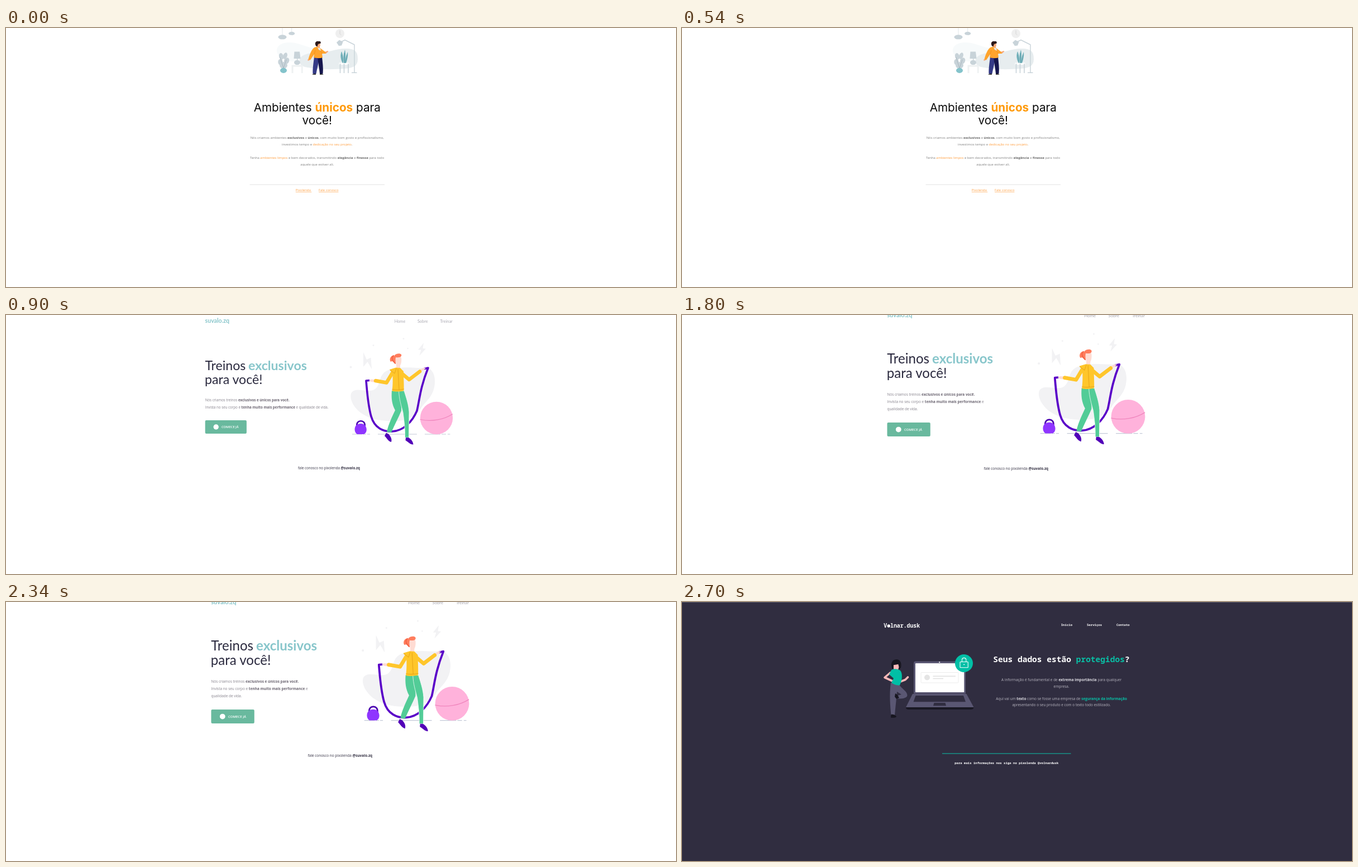
Recreate the animation shown at these times as an HTML page. Size 1200 by 465 pixels, loop 3.6 s.

```html
<!DOCTYPE html>
<html lang="pt-BR">
<head>
<meta charset="utf-8">
<title>Páginas</title>
<style>
html, body { margin: 0; width: 100%; height: 100%; overflow: hidden; background: #fff; }
svg { display: block; width: 1200px; height: 465px; font-family: "Open Sans", sans-serif; }
text { white-space: pre; }
.b { font-weight: 700; }
.mid { text-anchor: middle; }
.line { fill: none; stroke-linecap: round; stroke-linejoin: round; }

.scene { visibility: hidden; animation: 3.6s step-end infinite; }
#decor { animation-name: first; }
#fit { animation-name: middle; }
#safe { animation-name: last; }
@keyframes first { 0% { visibility: visible } 25%, 100% { visibility: hidden } }
@keyframes middle { 0% { visibility: hidden } 25% { visibility: visible } 75%, 100% { visibility: hidden } }
@keyframes last { 0% { visibility: hidden } 75%, 100% { visibility: visible } }

/* the page zooms in halfway and its last sentence wraps */
#zoom, #copy, #button, .wide, .wrapped { animation: 3.6s step-end infinite; }
#zoom { animation-name: zoom; }
#copy { animation-name: rise; }
#button { animation-name: sink; }
.wide { animation-name: wide; }
.wrapped { animation-name: wrapped; }
@keyframes zoom { 0% { transform: none } 50%, 100% { transform: translate(-4.1px, -10.3px) scale(1.0417) } }
@keyframes rise { 0% { transform: none } 50%, 100% { transform: translateY(-6.2px) } }
@keyframes sink { 0% { transform: none } 50%, 100% { transform: translateY(6.2px) } }
@keyframes wide { 0% { fill-opacity: 1 } 50%, 100% { fill-opacity: 0 } }
@keyframes wrapped { 0% { fill-opacity: 0 } 50%, 100% { fill-opacity: 1 } }

#decor .title { font: 400 20.7px Inter, sans-serif; fill: #0b0b0b; }
#decor .title .b { font-weight: 700; fill: #ff9a0a; }
#decor .body { font-size: 5.92px; fill: #808080; }
#decor .body .b { fill: #666; }
#decor .o { fill: #ff9c3c; }
#decor .link { text-decoration: underline; }

#fit .title { font: 400 23.1px Lato, sans-serif; fill: #2b2a3f; }
#fit .title.teal { font-weight: 700; fill: #88c6cb; }
#fit .logo { font: 700 10.6px Lato, sans-serif; fill: #88c6cb; }
#fit .nav { font: 400 7.35px Lato, sans-serif; fill: #aaa9b2; }
#fit .body { font-size: 6.2px; fill: #86828c; }
#fit .body .b { fill: #6c6672; }
#fit .foot { font-size: 6.2px; fill: #353244; }

#safe .mono { font-family: "Noto Sans Mono", "DejaVu Sans Mono", monospace; font-weight: 700; fill: #fff; }
#safe .body { font-size: 6.47px; fill: #b7b5bf; }
#safe .body .b { fill: #dcdbe1; }
#safe .t, #safe .body .t { fill: #08bfa5; }
</style>
</head>
<body>
<svg viewBox="0 0 1200 465">

<g id="decor" class="scene">
  <!-- room -->
  <path fill="#f7fafb" d="M485 41C485 27 503 24 518 27S542 36 558 37 578 50 566 58 540 52 527 58 486 56 485 41Z"/>
  <path fill="#e7edef" d="M526 61C524 50 538 44 556 45S589 37 608 37 630 44 630 56 622 72 606 73 575 75 558 73 527 71 526 61Z"/>
  <path stroke="#d5dde1" stroke-width=".7" d="M495 0V13M511.700 0V8"/>
  <g fill="#c8d3d9">
    <ellipse cx="495" cy="16.300" rx="7.500" ry="4"/>
    <ellipse cx="511.700" cy="9.800" rx="5.600" ry="3"/>
    <path d="M592 26 597 21.500 603.500 25 601 31.500 596 32Z"/>
    <path d="M516.500 42.500H526L527.500 55H515.500ZM521 55h1.300v4H521Z"/>
    <ellipse cx="521.500" cy="62" rx="5.500" ry="4.200"/>
    <ellipse cx="493" cy="51" rx="4" ry="6" transform="rotate(-15 493 51)"/>
    <ellipse cx="500" cy="50" rx="3.600" ry="6" transform="rotate(20 500 50)"/>
    <ellipse cx="491.500" cy="61" rx="4.200" ry="5.500"/>
    <ellipse cx="502.500" cy="59" rx="4.500" ry="6" transform="rotate(25 502.500 59)"/>
    <ellipse cx="497" cy="67" rx="7" ry="6"/>
  </g>
  <path class="line" stroke="#8e9fa8" stroke-width=".5" d="M491 53 497 72 502 57"/>
  <ellipse cx="497" cy="76.300" rx="6" ry="4.600" fill="#84c3cb"/>
  <path fill="#eef1f2" d="M511.500 66.500H531.500V81H529V69.500H514.500V81H511.500Z"/>
  <circle cx="598" cy="10" r="8" fill="#efefef"/>
  <path class="line" stroke="#cfcfcf" stroke-width=".8" d="M598 5V10.500L600 12.500"/>
  <path class="line" stroke="#c8d3d9" stroke-width="1.400" d="M600 25 607 21.500 624 30V80M619.500 80.300H628"/>
  <path fill="#fff" d="M596.500 62.500H614.500V66H596.500Z"/>
  <path stroke="#c8d3d9" stroke-width="1.600" d="M598.500 64V81M605.500 64V81M613 64V81"/>
  <path fill="#76b4bd" d="M603 63C598 54 599 47 601 42 604 48 604 56 604 63ZM605 63C603 52 605 45 607 39 609 47 608 56 607 63ZM607 63C608 53 610 47 612 43 613 50 611 58 609 63Z"/>
  <path stroke="#4f8d98" stroke-width=".5" d="M603.500 62 601.500 48M606 62 606.500 45M608 62 611 48"/>
  <!-- visitor -->
  <path fill="#343a86" d="M552 52 561 53C560 64 557 73 555.500 82H549.500C549 72 551 61 552 52Z"/>
  <path fill="#15164d" d="M558 52 566 52C567 62 568.500 72 567.500 82H562C561 72 559 62 558 52Z"/>
  <path fill="#222" d="M548.500 83.700C549 82 552 82 555 82V83.700ZM562 82C565 82 568 82 568.500 83.700H562Z"/>
  <path fill="#f6a879" d="M556 30H562V37H556ZM540 57 543 55 545 57 541 59ZM571 43 576 41 577.500 42 573 46Z"/>
  <ellipse cx="559.500" cy="30" rx="3.400" ry="4.300" fill="#f6a879"/>
  <path fill="#ffa42d" d="M552 35C556 33 562 34 564 37L572 43 573 46 566 46 567 53C561 55 556 54 551 53L552 47 545 57.500 541.500 56C544 47 547 39 552 35Z"/>
  <path class="line" stroke="#e78812" stroke-width=".6" d="M552 47 554 40M563 40 566 46"/>
  <path fill="#e6e6e6" d="M558 35 563 36 564 41 560 39Z"/>
  <path fill="#2b1719" d="M554 29C553 25 557 23 560 24 563 23 565 26 563 28 560 28 558 29 558 33 555 33 554 31 554 29Z"/>

  <g class="mid">
    <text class="title" x="557.300" y="149.600">Ambientes <tspan class="b">únicos</tspan> para</text>
    <text class="title" x="557.300" y="173">você!</text>
    <g class="body">
      <text x="557.200" y="199.200">Nós criamos ambientes <tspan class="b">exclusivos</tspan> e <tspan class="b">únicos</tspan>, com muito bom gosto e profissionalismo,</text>
      <text x="557.200" y="211">investimos tempo e <tspan class="o">dedicação no seu projeto</tspan>.</text>
      <text x="557.200" y="234.700">Tenha <tspan class="o">ambientes limpos</tspan> e bem decorados, transmitindo <tspan class="b">elegância</tspan> e <tspan class="b">finesse</tspan> para todo</text>
      <text x="557.200" y="246.500">aquele que estiver ali.</text>
    </g>
  </g>
  <path stroke="#dcdcdc" stroke-width=".8" d="M436.500 281.200H678"/>
  <g class="body">
    <text class="o link" x="518.800" y="293.200">Pixolenda&#160;</text>
    <text class="o link" x="560" y="293.200">Fale conosco</text>
  </g>
</g>

<g id="fit" class="scene"><g id="zoom">
  <text class="logo" x="356.500" y="13.500">suvalo.zq</text>
  <g class="nav">
    <text x="695.700" y="14.200">Home</text>
    <text x="736.900" y="14.200">Sobre</text>
    <text x="777.600" y="14.200">Treinar</text>
  </g>

  <!-- backdrop -->
  <g fill="#f2f2f4">
    <path d="M618 141C624 128 645 139 657 135 674 129 664 106 685 99 705 91 735 96 752 95 768 96 770 117 767 130 763 148 752 155 744 166 736 180 719 190 700 190 672 192 650 186 636 176 624 167 615 153 618 141Z"/>
    <path d="M640 67 646 80 653.500 76.500 655 97 647.500 84 640 93Z"/>
    <path d="M748 50 738 62.500 743.500 62.500 740.500 73 752 60.500 746.500 60Z"/>
    <circle cx="617.500" cy="93.500" r="2"/><circle cx="658" cy="54.500" r="1.500"/>
    <circle cx="712" cy="42.500" r="1.500"/><circle cx="719.500" cy="60" r="1.200"/>
  </g>
  <path stroke="#c3c9d8" stroke-width="1.200" d="M620 214H638M640 214H645M647 214H652M666 214H736M750 214H778M780 214H788M791 214H795.500"/>
  <circle cx="771" cy="185" r="29.200" fill="#ffb2db"/>
  <path class="line" stroke="#f086bd" stroke-width="1.200" d="M742 187.500C762 192 784 188 799.500 178"/>
  <path class="line" stroke="#4a00b0" stroke-width="2.600" d="M628.500 200C626 187 645 187 642.500 200"/>
  <path fill="#8f35ff" d="M629 214C624 211 623 203 627 198 632 194 639 194 643 198 647 203 647 211 641 214Z"/>

  <!-- athlete -->
  <path class="line" stroke="#5a00c8" stroke-width="3.600" d="M650 117.500 645 118C647 140 648 160 654 182 660 203 676 210 692 209 712 208 728 191 736 172 741 150 742 130 756 95L749 96.500"/>
  <path fill="#52cc97" d="M691 136 706 136C705 150 709 160 708 172 703 184 696 197 690 211L682 210C685 196 691 184 697 171 691 160 690 149 691 136Z"/>
  <path fill="#52cc97" stroke="#fff" stroke-width=".7" d="M703.500 136H713C717 149 721 160 722 174L721.500 220H714.500C715 204 713 190 711 175 708 163 704 151 703.500 136Z"/>
  <path fill="#5200b8" d="M681 211.500 685.500 214C688 217 692 222 690 228 685 227 682 221 678 217ZM716 220H721C724 222 729 226 729.500 232.500 724 233 721 228 715.500 225Z"/>
  <path fill="#ffdcd3" d="M699 86H706V97H699ZM662 116 654 115.500 650 117.500 654 120 662 121ZM741 99 747 95 752 95 748 99 743 102Z"/>
  <path class="line" stroke="#ffc62b" stroke-width="6.500" d="M692 104 681.500 121.500 662 118M709 105 722 116 741 101.500"/>
  <path fill="#ffc62b" d="M687 98 698 94.500 706 95 712 101C712 113 713 125 712.500 136 705 138 697 138 691.500 136.500 693 125 693 113 692 104Z"/>
  <path class="line" stroke="#e8a61a" stroke-width="1" d="M692 133.500C700 135 706 134.500 712.500 133M702 97 704 134M688 99 696 105 699 96"/>
  <path fill="#ffdcd3" d="M697 76C699 72 707 72 708 77 709 84 707 92 703 93 699 93 697 85 697 76Z"/>
  <path fill="#ff7d5d" d="M695 77C693 70 705 67 708 71 709 74 707 77 698 76 697 80 698 85 698 88 694 86 693 81 689 84 686 80 688 73 695 72Z"/>
  <path class="line" stroke="#f0593c" stroke-width="1.200" d="M694 73C689 77 693 83 697 87"/>

  <g id="copy">
    <text class="title" x="356.500" y="99.200">Treinos</text>
    <text class="title teal" x="434" y="99.200">exclusivos</text>
    <text class="title" x="356" y="124.200">para você!</text>
    <g class="body">
      <text x="356.700" y="155.200">Nós criamos treinos <tspan class="b">exclusivos e únicos para você.</tspan></text>
      <text x="356.700" y="167.500">Invista no seu corpo e <tspan class="b">tenha muito mais performance</tspan> e <tspan class="wide">qualidade de vida.</tspan></text>
      <text class="wrapped" x="356.700" y="179.900">qualidade de vida.</text>
    </g>
  </g>
  <g id="button">
    <rect x="356.700" y="189" width="74.200" height="24" rx="2" fill="#69b99e"/>
    <circle cx="376.200" cy="201" r="4.700" fill="#fff"/>
    <text x="386" y="203.200" font-size="5.800" font-weight="600" fill="#fff">COMECE JÁ</text>
  </g>
  <text class="foot mid" x="578.400" y="276.700">fale conosco no pixolenda <tspan class="b">@suvalo.zq</tspan></text>
</g></g>

<g id="safe" class="scene">
  <path fill="#302d40" d="M0 0H1200V465H0Z"/>
  <path fill="#5b5969" d="M0 0H1200V1H0Z"/>
  <g class="mono">
    <text x="361.200" y="45.800" font-size="9.850">V&#160;lnar.dusk</text>
    <g font-size="5.700">
      <text x="678.700" y="43.300">Início</text>
      <text x="724.900" y="43.300">Serviços</text>
      <text x="777.900" y="43.300">Contato</text>
    </g>
    <text x="557.300" y="107.800" font-size="14.550">Seus dados estão <tspan class="t">protegidos</tspan>?</text>
    <text class="mid" x="581.200" y="291.300" font-size="5.650">para mais informações nos siga no pixolenda @volnardusk</text>
  </g>
  <circle cx="370.200" cy="43" r="2.700" fill="#fff"/>

  <!-- laptop -->
  <path fill="#5a5773" d="M418 106.500H505Q508 106.500 508 110V164.500H415V110Q415 106.500 418 106.500Z"/>
  <rect x="418" y="110" width="87.300" height="52" rx="1" fill="#fff"/>
  <circle cx="461.200" cy="108.200" r="1.100" fill="#fff"/>
  <rect x="428" y="126.500" width="67" height="18.500" rx="1" fill="#fff" stroke="#e8e8e8" stroke-width=".8"/>
  <circle cx="439" cy="135.500" r="5" fill="#e4e4e4"/>
  <path stroke="#e0e0e0" stroke-width="1.500" d="M449.500 133.200H490M449.500 137.500H468"/>
  <path fill="#5a5773" d="M413 165H509.500L522.500 189H401Z"/>
  <path fill="#191823" d="M401 189H522.500C522 192 520 193 517 193H406C403 193 401 192 401 189Z"/>
  <path fill="#302d40" d="M418.500 168H504L508 179.300H414.500ZM451.500 181H471.500L473 186.300H450Z"/>
  <circle cx="505" cy="110" r="16" fill="#00bfa6"/>
  <g class="line" stroke="#fff" stroke-width="1.100">
    <rect x="498" y="107.500" width="14.300" height="10.300" rx=".8"/>
    <path d="M501.500 107.500V103.800C501.500 99.200 508.800 99.200 508.800 103.800V107.500"/>
  </g>
  <circle cx="505.200" cy="112.200" r="1" fill="#fff"/>

  <!-- woman -->
  <path fill="#171620" d="M376 119C373 112 376 103 384 103 391 103 394 110 392 118 390 122 381 122 376 119Z"/>
  <path fill="#ffb8b8" d="M379 111 387 110 388.500 117 387 122 379 121Z"/>
  <path fill="#171620" d="M376.500 113C377 106 389 106 390 112 386 111 383 113 380 113Z"/>
  <path class="line" stroke="#ffb8b8" stroke-width="3.600" d="M373 127 363 135.500 376 141.500M391 143 400 139.500 404.500 135"/>
  <path fill="#5a5773" d="M374 145 389 148C392 155 404 160 403.500 168 402 174 390 174 382 173L383 169 393 166 385 161C384 175 382 190 381 203H374.500C373 187 371 166 374 145Z"/>
  <path fill="#00bfa6" d="M375 122C380 119 387 120 391 123 395 128 394 136 393 142L390 149.500C384 150 379 148 375 145L379 137 371 130Z"/>
  <path fill="#171620" d="M374.500 202C378 201 382 203 384 205.500 384 208 378 208 374 207.500ZM382 164 386 167 389 172 384 174 381 170Z"/>

  <g class="body mid">
    <text x="679.600" y="142.300">A informação é fundamental e de <tspan class="b">extrema importância</tspan> para qualquer</text>
    <text x="679.600" y="153.600">empresa.</text>
    <text x="679.600" y="176.100">Aqui vai um <tspan class="b">texto</tspan> como se fosse uma empresa de <tspan class="b t">segurança da informação</tspan></text>
    <text x="679.600" y="187.400">apresentando o seu produto e com o texto todo estilizado.</text>
  </g>
  <path stroke="#12a594" stroke-width="1.200" d="M466 272.200H696.500"/>
</g>
</svg>
</body>
</html>
```
